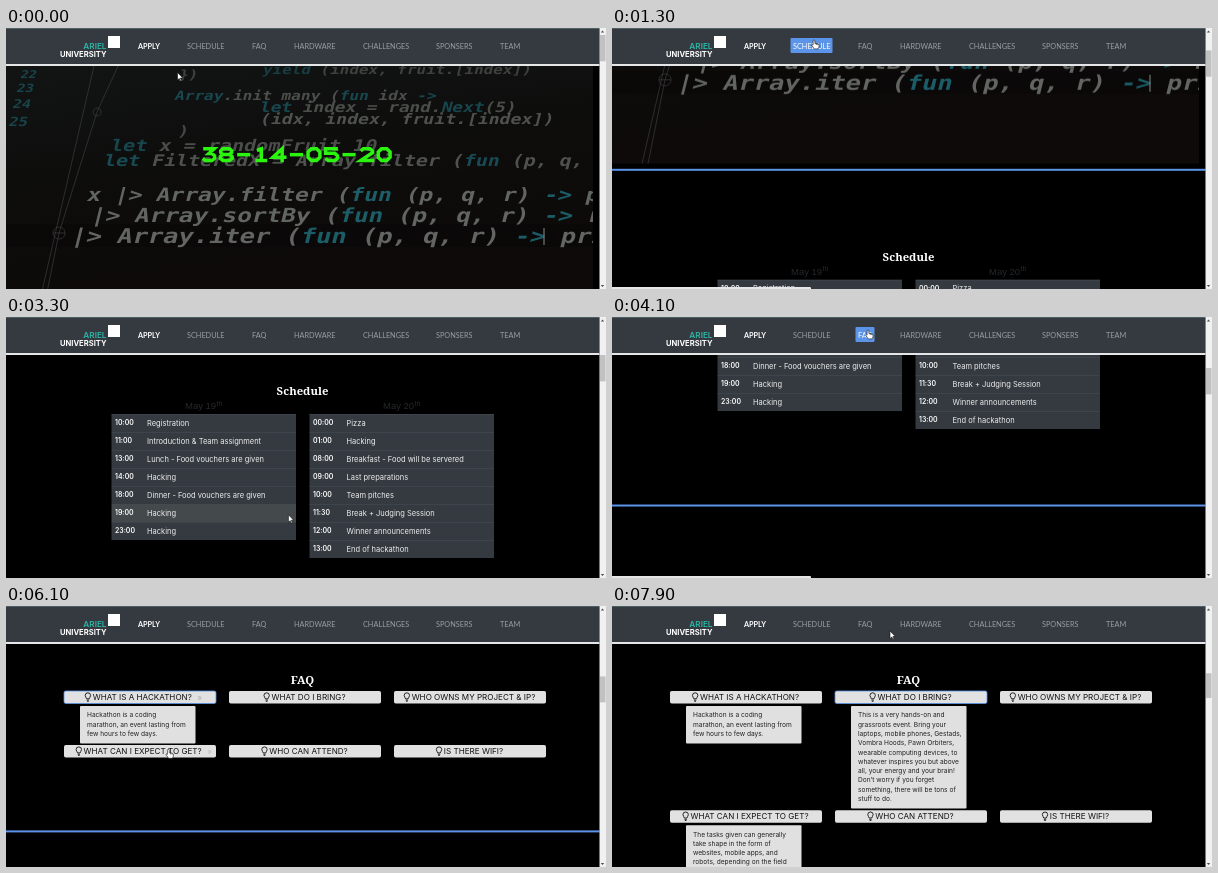
An HTML page for the animation above (8 s loop, 600 by 261 pixels).

```html
<!DOCTYPE html>
<html lang="en">
<head>
<meta charset="utf-8">
<title>Hackathon site</title>
<style>
html, body { margin: 0; width: 100%; height: 100%; overflow: hidden; background: #000; }
svg { display: block; }
#stage { width: 100%; height: 100%; }
text { font-family: Inter, sans-serif; white-space: pre; }
.nav { font-family: Lato, sans-serif; }
.title { font-family: "Noto Serif", serif; font-weight: 700; }
.day { font-family: "Liberation Sans", Arial, sans-serif; }
.code { font-family: "DejaVu Sans Mono", monospace; font-weight: 700; }
</style>
</head>
<body>
<svg id="stage" viewBox="0 0 600 261">
  <defs>
    <linearGradient id="photo" x1="0" y1="0" x2=".25" y2="1">
      <stop offset="0" stop-color="#141717"/>
      <stop offset=".5" stop-color="#0d0d0c"/>
      <stop offset="1" stop-color="#0d0a09"/>
    </linearGradient>
  </defs>
</svg>
<script>
const LOOP = 8000, BLUE = '#5b94e8', DARK = '#343a40', WIDTH = 593.5;
const stage = document.getElementById('stage');

function add(parent, tag, attrs = {}, text) {
  const el = document.createElementNS('http://www.w3.org/2000/svg', tag);
  set(el, attrs);
  if (text !== undefined) el.textContent = text;
  return parent.appendChild(el);
}
function set(el, attrs) {
  for (const k in attrs) el.setAttribute(k, attrs[k]);
}
const rect = (p, x, y, width, height, fill, more) =>
  add(p, 'rect', { x, y, width, height, fill, ...more });
// y is the middle of the capital letters
const label = (p, str, x, y, size, fill, more) =>
  add(p, 'text', { x, y: y + size * .36, 'font-size': size, fill, ...more }, str);
const move = (el, x, y) => el.setAttribute('transform', `translate(${x} ${y})`);
const show = (el, on) => el.setAttribute('visibility', on ? 'visible' : 'hidden');

const page = add(stage, 'g');

// Hero: dim, tilted screen of code, clipped to the picture
const hero = add(page, 'svg', { width: 587, height: 289 });
rect(hero, 0, 0, 587, 289, 'url(#photo)');
rect(hero, 0, 196, 587, 23, '#000', { opacity: .25 });
add(hero, 'path', {
  d: 'M88 38L30 289M112 38L91 84L53 205L36 289M53 199a6 6 0 1 0 .1 0M47 205h12M91 80a4 4 0 1 0 .1 0',
  fill: 'none', stroke: '#45484a', 'stroke-width': .8, opacity: .7
});
const code = add(hero, 'g', { style: 'filter:blur(.5px)' });
[
  ['})', 172, 46, 9.6, .5],
  ['yield (index, fruit.[index])', 256, 41, 9.6, .5],
  ['Array.init many (fun idx ->', 168, 67, 9.7, .65],
  ['let index = rand.Next(5)', 253, 79, 10.7, .65],
  ['(idx, index, fruit.[index])', 253, 91, 10.9, .7],
  [')', 171, 103, 10.8, .6],
  ['let x = randomFruit 10', 104, 117, 12.1, .65],
  ['let FilteredX = Array.filter (fun (p, q,', 97, 132, 12, .7],
  ['x |> Array.filter (fun (p, q, r) -> p', 80, 166, 13.85, .9],
  ['|> Array.sortBy (fun (p, q, r) -> r)', 84, 187, 14.6, .9],
  ['|> Array.iter (fun (p, q, r) -> print', 64, 208, 15.3, .9],
  ['22', 14, 46, 8, .6],
  ['23', 10, 60, 8.5, .6],
  ['24', 6, 76, 9, .6],
  ['25', 2, 93, 9.5, .6]
].forEach(([str, x, y, step, opacity]) => {
  const size = step / .602;
  const line = add(code, 'text', {
    class: 'code', 'font-size': size, fill: '#6c706c', opacity,
    transform: `translate(${x} ${y + size * .29}) skewX(-14) scale(1 .8)`
  });
  str.split(/(let|fun\b|->|Next|yield|Array(?=\.init)|^\d\d$)/).forEach((part, i) =>
    add(line, 'tspan', i % 2 ? { fill: '#1f6672' } : {}, part));
});
add(hero, 'path', { d: 'M538 200V217', stroke: '#777', 'stroke-width': 1.2 });

// Countdown in blocky strokes on a 7 x 7 grid
const GLYPHS = {
  0: 'M2.3 .8H4.7L6.2 2.3V4.7L4.7 6.2H2.3L.8 4.7V2.3Z',
  1: 'M1.5 1.6L3.5 .8V6.2M.8 6.2H6.2',
  2: 'M.8 1.8L2 .8H5L6.2 1.8V2.6L.8 6.2H7',
  3: 'M1 .8H6L3.6 3H5L6.2 4V5.2L5 6.2H2L.8 5.2',
  4: 'M5 7V.8L.8 4.7H7',
  5: 'M6.4 .8H.8V2.9H5L6.2 4V5.2L5 6.2H2L.8 5.2',
  8: 'M2 .8H5L6 1.7V2.5L5 3.4H2L1 2.5V1.7ZM2 3.4L.8 4.4V5.2L2 6.2H5L6.2 5.2V4.4L5 3.4',
  9: 'M5.5 3.6H2L.8 2.6V1.8L2 .8H5L6.2 2V4.6L4.5 6.2H1.8',
  '-': 'M.5 3.5H6.5'
};
const clock = [...Array(11)].map((_, i) => add(page, 'path', {
  transform: `translate(${195 + i * 17.55} 119) scale(2.19)`,
  fill: 'none', stroke: '#2bf50e', 'stroke-width': 1.6
}));

// Schedule
const SCHEDULE_AT = 308, FAQ_AT = 639;
rect(page, 0, 294, WIDTH, 2, BLUE);
label(page, 'Schedule', 296.5, SCHEDULE_AT + 74, 11.3, '#fff', { class: 'title', 'text-anchor': 'middle' });
const rows = [];
function table(x, day, items) {
  const top = SCHEDULE_AT + 97;
  label(page, day, x + 73.5, top - 8, 9.5, '#25282b', { class: 'day' });
  label(page, 'th', x + 105, top - 11, 7, '#25282b', { class: 'day' });
  items.forEach(([time, name], i) => {
    const y = top + i * 18;
    rows.push({ x, y, bg: rect(page, x, y, 184.5, 18, DARK) });
    rect(page, x, y, 184.5, .6, '#454c53');
    label(page, time, x + 3.5, y + 9, 6.9, '#fff', { 'font-weight': 600 });
    label(page, name, x + (x < 200 ? 35.5 : 37), y + 9, 7.5, '#eee');
  });
}
table(105.5, 'May 19', [
  ['10:00', 'Registration'],
  ['11:00', 'Introduction & Team assignment'],
  ['13:00', 'Lunch - Food vouchers are given'],
  ['14:00', 'Hacking'],
  ['18:00', 'Dinner - Food vouchers are given'],
  ['19:00', 'Hacking'],
  ['23:00', 'Hacking']
]);
table(303.5, 'May 20', [
  ['00:00', 'Pizza'],
  ['01:00', 'Hacking'],
  ['08:00', 'Breakfast - Food will be servered'],
  ['09:00', 'Last preparations'],
  ['10:00', 'Team pitches'],
  ['11:30', 'Break + Judging Session'],
  ['12:00', 'Winner announcements'],
  ['13:00', 'End of hackathon']
]);

// FAQ
rect(page, 0, 624.5, WIDTH, 2, BLUE);
label(page, 'FAQ', 296.5, FAQ_AT + 74, 11.3, '#fff', { class: 'title', 'text-anchor': 'middle' });
const endLine = rect(page, 0, 0, WIDTH, 2, BLUE);
const cards = [
  ['WHAT IS A HACKATHON?', 5700, ['Hackathon is a coding', 'marathon, an event lasting from', 'few hours to few days.']],
  ['WHAT DO I BRING?', 7350, ['This is a very hands-on and', 'grassroots event. Bring your',
    'laptops, mobile phones, Gestads,', 'Vombra Hoods, Pawn Orbiters,', 'wearable computing devices, to',
    'whatever inspires you but above', 'all, your energy and your brain!', 'Don\u2019t worry if you forget',
    'something, there will be tons of', 'stuff to do.']],
  ['WHO OWNS MY PROJECT & IP?'],
  ['WHAT CAN I EXPECT TO GET?', 6450, ['The tasks given can generally', 'take shape in the form of',
    'websites, mobile apps, and', 'robots, depending on the field', 'of the company sponsoring the', 'event.']],
  ['WHO CAN ATTEND?'],
  ['IS THERE WIFI?']
].map(([question, click = Infinity, answer = []], i) => {
  const x = 58 + i % 3 * 165, row = Math.floor(i / 3);
  const group = add(page, 'g');
  const frame = rect(group, x, 0, 152, 12.5, '#e1e1e1', { rx: 1.8, 'stroke-width': .8 });
  const face = add(group, 'g');
  const text = label(face, question, x + 79.5, 6.2, 8.1, '#111', { 'text-anchor': 'middle' });
  const half = text.getComputedTextLength() / 2;
  add(face, 'path', {
    d: 'M1.9 6.2C1.9 5 .5 4.4 .5 2.9a2.7 2.7 0 0 1 5.4 0c0 1.5-1.4 2.1-1.4 3.3zM2 7.5h2.4M2.4 8.7h1.6',
    transform: `translate(${x + 71.5 - half} 1.6)`, fill: 'none', stroke: '#111', 'stroke-width': .9
  });
  const arrow = label(face, '\u00bb', x + 85 + half, 6.2, 8.1, '#111');
  const panel = add(group, 'g');
  const height = answer.length * 9.3 + 9.5;
  rect(panel, x + 16, 15, 115.5, height, '#e0e0e0', { rx: 1 });
  answer.forEach((str, k) => label(panel, str, x + 23, 24 + k * 9.3, 6.6, '#222'));
  return { x, row, click, height, group, frame, face, arrow, panel };
});

// Navigation bar
rect(stage, 0, 0, WIDTH, 36, DARK);
rect(stage, 0, 0, WIDTH, 1, '#4c6063');
rect(stage, 0, 36, WIDTH, 2, '#e4e6e8');
label(stage, 'ARIEL', 100.5, 18, 8.2, '#2bb5a5', { 'text-anchor': 'end', 'font-weight': 600 });
label(stage, 'UNIVERSITY', 100.5, 26, 7.6, '#fff', { 'text-anchor': 'end', 'font-weight': 700 });
rect(stage, 102, 8, 12, 12, '#fff');
const links = [
  ['APPLY', 132, 21.5], ['SCHEDULE', 181, 37], ['FAQ', 246, 14], ['HARDWARE', 288, 41],
  ['CHALLENGES', 357, 45], ['SPONSERS', 430, 36.5], ['TEAM', 494, 19.5]
].map(([name, x, w], i) => ({
  x: x - 2.5, w: w + 5, color: i ? '#9a9da0' : '#fff',
  box: rect(stage, x - 2.5, 10, w + 5, 15, BLUE, { rx: 1 }),
  text: label(stage, name, x, 18, 7.3, '#fff', { class: 'nav', 'font-weight': i ? 400 : 700 })
}));

// Browser parts
rect(stage, WIDTH, 0, 7, 261, '#f1f1f1');
add(stage, 'path', { d: 'M594.8 4.5L596.5 2.5L598.2 4.5ZM594.8 257L596.5 259L598.2 257Z', fill: '#505050' });
const thumb = rect(stage, 594, 7, 5.5, 26, '#c1c1c1');
const status = rect(stage, -2, 259, 201, 5, '#e6e6e6', { rx: 1 });
const pen = { fill: '#fff', stroke: '#111', 'stroke-width': .6 };
const pointer = add(stage, 'path', { d: 'M0 0V7.6L1.8 6 2.9 8.5 4 8 2.9 5.5H5.3Z', ...pen });
const hand = add(stage, 'path', {
  d: 'M1 0q.9 0 .9 1v2.4q3.6 0 4.1 1.3v2.2l-1 2H1.3L-1.5 5q.4-.9 1.6 0V1q0-1 .9-1zM3.3 3.6v1.4M4.7 3.9v1.2', ...pen
});

const PATH = [
  [0, 171.5, 44.5], [150, 171.5, 44.5], [550, 201, 12], [1800, 201, 12], [2100, 259, 189],
  [2600, 262, 194], [3000, 285, 215], [3250, 285, 215], [3520, 255, 13], [4650, 255, 13],
  [4850, 194, 90], [5450, 194, 90], [5600, 188, 91], [5800, 188, 91], [6150, 160, 146],
  [6500, 160, 146], [6800, 288, 93], [7380, 288, 93], [7700, 280, 40], [7850, 278, 25], [LOOP, 278, 25]
];
const clamp = v => Math.min(1, Math.max(0, v));
const swing = p => .5 - Math.cos(Math.PI * clamp(p)) / 2;

function cursorAt(t) {
  const i = Math.max(1, PATH.findIndex(k => k[0] >= t));
  const [t0, x0, y0] = PATH[i - 1], [t1, x1, y1] = PATH[i];
  const p = swing((t - t0) / (t1 - t0));
  return [x0 + (x1 - x0) * p, y0 + (y1 - y0) * p];
}
const scrollAt = t =>
  SCHEDULE_AT * swing((t - 703) / 1200) + (FAQ_AT - SCHEDULE_AT) * swing((t - 3586) / 1200);

function growth(t, row) {
  return Math.max(0, ...cards.filter(c => c.row === row && t >= c.click).map(c => c.height));
}
const cardTop = (c, t) => FAQ_AT + 85 + (c.row && 16.7 + growth(t, 0));
const inside = (px, py, x, y, w, h) => px >= x && px < x + w && py >= y && py < y + h;

function overCard(c, t) {
  const [x, y] = cursorAt(Math.max(0, t));
  return y > 37 && inside(x, y + scrollAt(t), c.x, cardTop(c, t), 152, 12.5);
}
// Share of the last 300 ms spent over the card
function hoverAmount(c, t) {
  let n = 0;
  for (let k = 0; k < 12; k++) n += overCard(c, t - k * 25);
  return n / 12;
}

function draw(t) {
  const s = scrollAt(t), [cx, cy] = cursorAt(t);
  move(page, 0, -s);

  const left = `38-14-05-${20 - Math.floor(t / 1000)}`;
  clock.forEach((el, i) => el.setAttribute('d', GLYPHS[left[i]] || ''));

  for (const r of rows) {
    const on = cy > 37 && inside(cx, cy + s, r.x, r.y, 184.5, 18);
    r.bg.setAttribute('fill', on ? '#44494c' : DARK);
  }

  for (const c of cards) {
    const amount = hoverAmount(c, t);
    move(c.group, 0, cardTop(c, t));
    move(c.face, -5 * amount, 0);
    c.arrow.setAttribute('opacity', amount);
    c.frame.setAttribute('stroke', t >= c.click && t < c.click + 700 ? BLUE : 'none');
    show(c.panel, t >= c.click);
  }
  const grown = growth(t, 0) + growth(t, 1);
  endLine.setAttribute('y', FAQ_AT + 187 + grown);

  let onLink = false;
  for (const l of links) {
    const on = inside(cx, cy, l.x, 10, l.w, 15);
    onLink ||= on;
    show(l.box, on);
    l.text.setAttribute('fill', on ? '#fff' : l.color);
  }
  show(status, onLink);

  const ratio = 247 / (2450 + grown);
  set(thumb, { y: 7 + s * ratio, height: 261 * ratio });

  const isHand = onLink || cards.some(c => overCard(c, t));
  show(hand, isHand);
  show(pointer, !isHand);
  move(isHand ? hand : pointer, cx, cy);
}

const start = performance.now();
function tick() {
  draw((performance.now() - start) % LOOP);
  requestAnimationFrame(tick);
}
tick();
</script>
</body>
</html>
```
